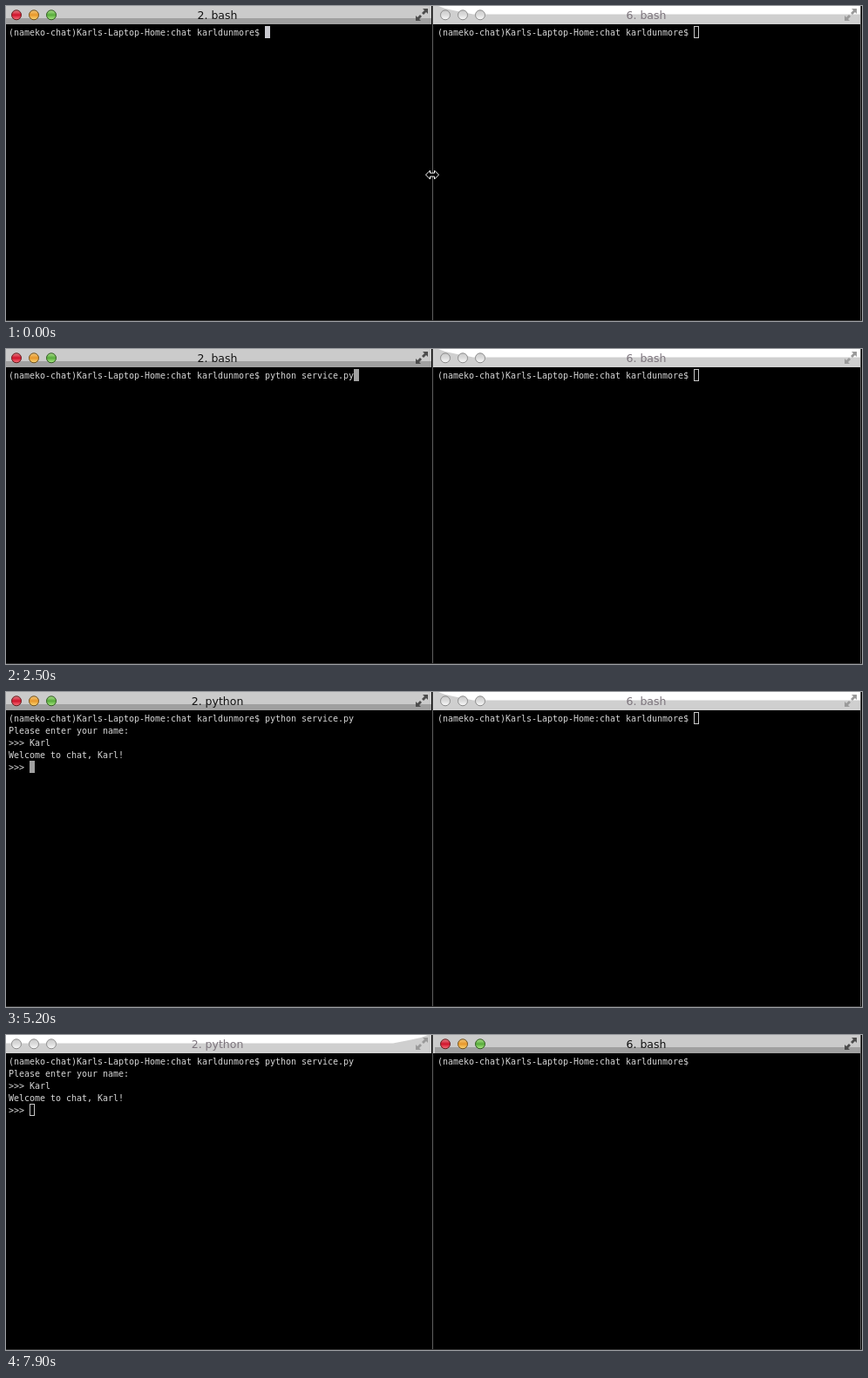
Animation of 982 by 362 pixels, one loop 8000 ms. Source, as an HTML page with a canvas:

```html
<!DOCTYPE html>
<html lang="en">
<head>
<meta charset="utf-8">
<title>Terminal chat</title>
<style>
  html, body { margin: 0; width: 100%; height: 100%; overflow: hidden; background: #000; }
  canvas { display: block; }
</style>
</head>
<body>
<canvas id="stage" width="982" height="362"></canvas>
<script>
const ctx = document.getElementById('stage').getContext('2d');
const LOOP = 8000, CELL = 6, LINE = 14, RIGHT_X = 492, PANE_W = 488;
const PROMPT = '(nameko-chat)Karls-Laptop-Home:chat karldunmore$ ';
const COMMAND = 'python service.py', NAME = 'Karl';

// Times in ms
const TYPE_START = 900, KEY = 100, RUN = 2600, ASK = 3000, RETITLE = 3600;
const NAME_START = 4500, WELCOME = 5100, SWITCH = 7600;

const typed = (text, start, t) =>
  text.slice(0, Math.max(0, Math.floor((t - start) / KEY) + 1));

function terminalLines(t) {
  const lines = [PROMPT + typed(COMMAND, TYPE_START, t)];
  if (t >= ASK) lines.push('Please enter your name:', '>>> ' + typed(NAME, NAME_START, t));
  else if (t >= RUN) lines.push('');
  if (t >= WELCOME) lines.push(`Welcome to chat, ${NAME}!`, '>>> ');
  return lines;
}

function cursorOn(t) {
  if (t < TYPE_START) return t < 400;
  const typing = t < RUN || (t >= NAME_START && t < WELCOME);
  const phase = t % 1000;
  return typing || (phase >= 200 && phase < 700);
}

function rect(color, x, y, w, h) {
  ctx.fillStyle = color;
  ctx.fillRect(x, y, w, h);
}

function polygon(color, ...points) {
  ctx.beginPath();
  points.forEach(([x, y]) => ctx.lineTo(x, y));
  ctx.closePath();
  ctx.fillStyle = color;
  ctx.fill();
}

function windowButton(x, colors) {
  const y = 10.3;
  const shade = ctx.createLinearGradient(0, y - 6, 0, y + 6);
  colors.slice(1).forEach((color, i) => shade.addColorStop(i / 2, color));
  ctx.beginPath();
  ctx.arc(x, y, 5.5, 0, Math.PI * 2);
  ctx.fillStyle = shade;
  ctx.fill();
  ctx.strokeStyle = colors[0];
  ctx.lineWidth = 1;
  ctx.stroke();
}

function expandIcon(color) {
  polygon(color, [478, 3], [484, 3], [484, 9], [482, 7], [479, 10], [477, 8], [480, 5]);
  polygon(color, [470, 11], [472, 13], [475, 10], [477, 12], [474, 15], [476, 17], [470, 17]);
}

const ACTIVE_BUTTONS = [
  ['#641c1c', '#e88c90', '#d0142c', '#ff8088'],
  ['#70501c', '#f4cc80', '#e8982c', '#ffe080'],
  ['#305a20', '#b4e494', '#58ac3c', '#b8f490']
];
const IDLE_BUTTON = ['#8c8c8c', '#c8c8c8', '#dcdcdc', '#ffffff'];

function titleBar(title, active, mirrored) {
  if (active) {
    rect('#cbcbcb', 0, 0, PANE_W, 14);
    rect('#a0a0a0', 0, 14, PANE_W, 7);
  } else {
    rect('#cfcfcf', 0, 0, PANE_W, 21);
    const x = d => mirrored ? PANE_W - d : d;
    polygon('#fff', [x(4), 0], [x(12), 3], [x(26), 6], [x(44), 9.5], [x(PANE_W), 9.5], [x(PANE_W), 0]);
  }
  ACTIVE_BUTTONS.forEach((colors, i) => windowButton(12 + 20 * i, active ? colors : IDLE_BUTTON));
  expandIcon(active ? '#4c4c4c' : '#9a9a9a');
  ctx.font = '12.5px "DejaVu Sans", sans-serif';
  ctx.textAlign = 'center';
  ctx.fillStyle = active ? '#111' : '#7c747c';
  ctx.fillText(title, 242.5, 15);
}

function terminalText(lines) {
  ctx.font = '10px "DejaVu Sans Mono", monospace';
  ctx.textAlign = 'left';
  ctx.fillStyle = '#d6d6d6';
  lines.forEach((line, row) => {
    [...line].forEach((char, col) => ctx.fillText(char, 3 + col * CELL, 34 + row * LINE));
  });
}

function textCursor(lines, active, visible, color) {
  const x = 3 + lines[lines.length - 1].length * CELL;
  const y = 24 + (lines.length - 1) * LINE;
  if (!active) {
    ctx.strokeStyle = '#c8c8c8';
    ctx.lineWidth = 1;
    ctx.strokeRect(x + 0.5, y - 0.5, 5, 13);
  } else if (visible) {
    rect(color, x, y - 1, 6, 14);
  }
}

function pane(x, title, lines, active, t) {
  ctx.save();
  ctx.translate(x, 0);
  titleBar(title, active, x === 0);
  terminalText(lines);
  textCursor(lines, active, cursorOn(t), t < TYPE_START ? '#cacad0' : '#a0a0a0');
  ctx.restore();
}

function resizePointer(x, y) {
  ctx.save();
  ctx.translate(x, y);
  polygon('#000', [-7.5, 0], [-2.5, -5], [-2.5, -2], [2.5, -2], [2.5, -5],
    [7.5, 0], [2.5, 5], [2.5, 2], [-2.5, 2], [-2.5, 5]);
  ctx.strokeStyle = '#fff';
  ctx.lineWidth = 1;
  ctx.stroke();
  ctx.restore();
}

function draw(t) {
  const leftActive = t < SWITCH;
  rect('#000', 0, 0, 982, 362);
  rect(leftActive ? '#cfcfcf' : '#cbcbcb', 490, 0, 2, 21);
  pane(0, t < RETITLE ? '2. bash' : '2. python', terminalLines(t), leftActive, t);
  pane(RIGHT_X, '6. bash', [PROMPT], !leftActive, t);
  rect('#606060', 489, 0, 1, 362);
  rect('#606060', 980, 0, 1, 362);
  rect('#303030', 0, 361, 982, 1);
  if (t < TYPE_START) resizePointer(489, 194);
}

function tick(now) {
  draw(now % LOOP);
  requestAnimationFrame(tick);
}
tick(performance.now());
</script>
</body>
</html>
```
